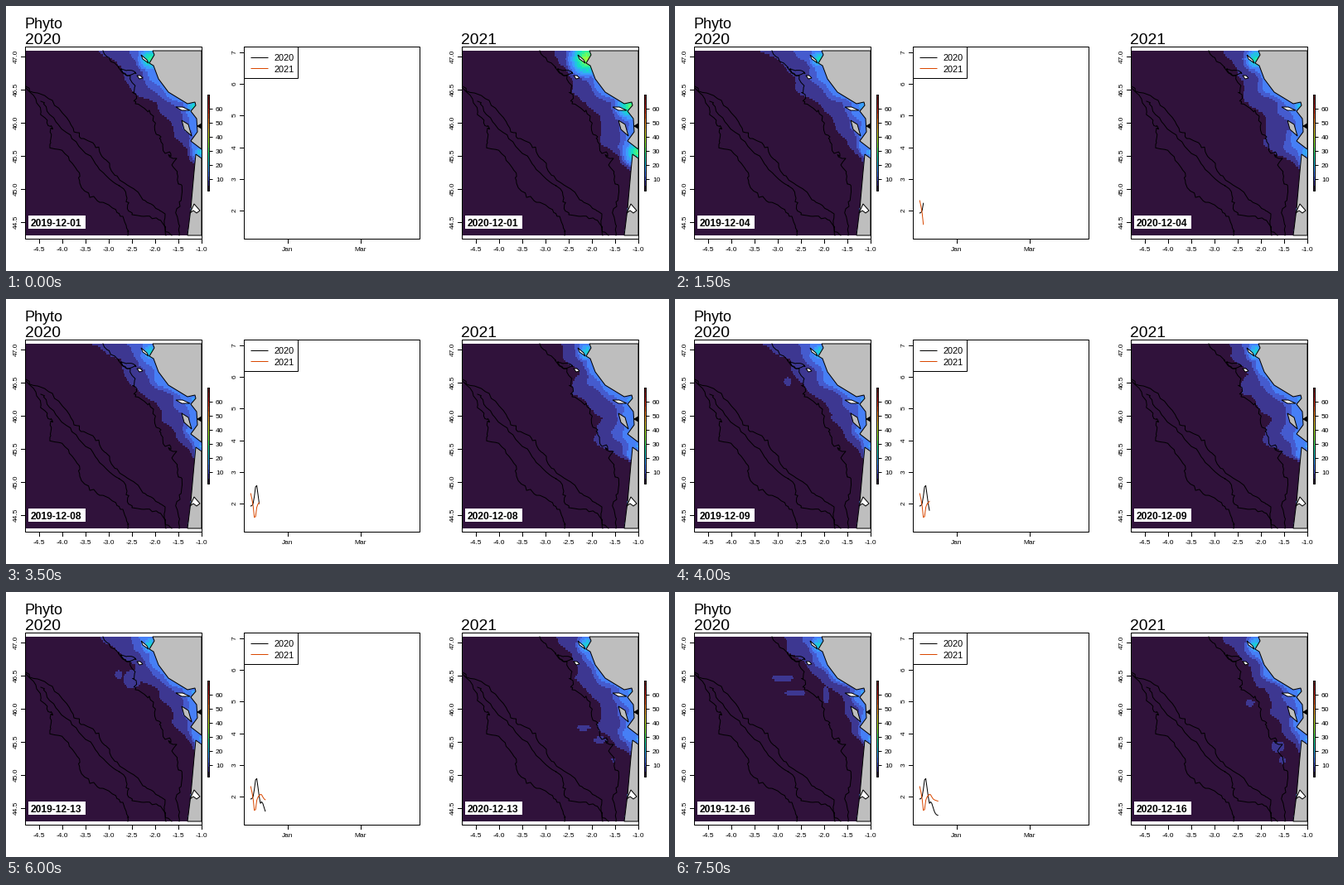
Animation, 800 px wide and 320 px high, one loop 8 s. Source, as a matplotlib script:

```python
import numpy as np
import matplotlib.pyplot as plt
from matplotlib.animation import FuncAnimation
from matplotlib.patches import Polygon, Rectangle

W, H, DPI = 800, 320, 100
PX = 72 / DPI
DAYS = 16
WEST, EAST, TOP, BOTTOM = 24, 236, 54, 277   # raster of the left map
SHIFT = 527                                  # from left map to right map
GREY, ORANGE = "#BEBEBE", "#D94801"
TURBO = plt.get_cmap("turbo")(np.linspace(0, 1, 20))

plt.rcParams["font.family"] = "Liberation Sans"
plt.rcParams["path.snap"] = False
rng = np.random.default_rng(4)

fig = plt.figure(figsize=(W / DPI, H / DPI), dpi=DPI, facecolor="white")
ax = fig.add_axes([0, 0, 1, 1])
ax.axis("off")


def line(xs, ys, color="black", z=4):
    return ax.plot(xs, ys, color=color, lw=PX, zorder=z)[0]


def label(x, y, s, size, ha="center", va="center", **kw):
    return ax.text(x, y, s, fontsize=size * PX, ha=ha, va=va, zorder=8, **kw)


def shape(pts, fill, dx=0):
    ax.add_patch(Polygon(np.add(pts, (dx, 0)), fc=fill, ec="black",
                         lw=PX, zorder=5))


def box(x0, y0, x1, y1, fill="none", z=6, edge="black"):
    ax.add_patch(Rectangle((x0, y0), x1 - x0, y1 - y0, fc=fill, ec=edge,
                           lw=PX, zorder=z))


def rough(pts, amp, rounds=3):
    """Midpoint displacement, for a natural looking contour."""
    p = np.array(pts, float)
    for _ in range(rounds):
        q = np.repeat(p, 2, axis=0)[:-1]
        q[1::2] = (p[1:] + p[:-1]) / 2 + rng.normal(0, amp, (len(p) - 1, 2))
        p, amp = q, amp / 1.6
    return p.clip((WEST, TOP), (EAST, BOTTOM))


# --- geography ---
NORTH = [(177, 54), (179, 59), (173, 69), (178, 72), (184, 88), (196, 104),
         (219, 118), (228, 116), (229, 120), (223, 127), (230, 136),
         (231, 152), (223, 163), (236, 173), (236, 54)]
SOUTH = [(236, 184), (229, 179), (227, 200), (223, 245), (219, 277), (236, 277)]
OLERON = [(212, 138), (220, 143), (224, 157), (215, 149)]
ISLANDS = [
    [(163, 59), (170, 65), (172, 69), (165, 64)],
    [(158, 84), (162, 84), (165, 87), (161, 88)],
    [(205, 122), (213, 122), (222, 126), (212, 126)],
    [(222, 250), (227, 239), (234, 247), (230, 250), (226, 247)],
]
NOTCH = [(231, 145), (236, 142), (236, 148)]

ISOBATHS = [
    rough([(24, 97), (56, 114), (82, 152), (107, 168), (125, 190),
           (151, 219), (178, 241), (192, 251), (200, 277)], 2.5),
    rough([(24, 99), (47, 135), (56, 148), (53, 167), (80, 190), (89, 214),
           (113, 237), (141, 254), (147, 277)], 2.5),
    rough([(42, 115), (63, 143), (96, 178), (125, 209), (146, 232),
           (152, 252), (184, 258), (193, 277)], 2.5),
    rough([(117, 54), (140, 80), (155, 100), (156, 118), (178, 133),
           (187, 158), (192, 178), (206, 184), (208, 215), (210, 242),
           (209, 277)], 3.2),
    rough([(139, 76), (148, 84), (156, 80), (139, 76)], 1.5),
]

# --- concentration field ---
NX, NY = 137, 100
cx = WEST + (np.arange(NX) + 0.5) * (EAST - WEST) / NX
cy = TOP + (np.arange(NY) + 0.5) * (BOTTOM - TOP) / NY
gx, gy = np.meshgrid(cx, cy)
shore = np.interp(cy, [54, 70, 90, 104, 118, 140, 166, 182, 277],
                  [177, 175, 185, 196, 221, 229, 226, 230, 219])
offshore = shore[:, None] - gx
ROWS = [54, 72, 90, 115, 145, 170, 186, 198]

# spread: plume width along ROWS at the start, middle and end of the loop
# patches: x, y, rx, ry and the day at which the patch is largest
PLUMES = [
    dict(spread=[[65, 36, 42, 42, 29, 12, 0, 0],
                 [75, 42, 41, 49, 37, 18, 7, 0],
                 [47, 36, 24, 28, 20, 13, 0, 0]],
         river=1.5, strip=16, phase=0,
         patches=[(136, 100, 10, 11, 10), (152, 106, 11, 12, 12.3),
                  (130, 104, 13, 4, 15), (145, 122, 12, 4, 15),
                  (182, 125, 4, 10, 15)]),
    dict(spread=[[41, 33, 26, 48, 36, 33, 5, 0],
                 [38, 27, 22, 56, 39, 46, 24, 0],
                 [41, 28, 18, 36, 34, 20, 8, 0]],
         river=4, strip=0, phase=2,
         patches=[(170, 164, 11, 4, 11), (190, 179, 11, 5, 11),
                  (167, 134, 5, 4, 15), (200, 187, 8, 7, 15),
                  (206, 203, 5, 5, 14)]),
]


def field(plume, day):
    u = day / (DAYS - 1)
    weights = (1 - u) * (1 - 2 * u), 4 * u * (1 - u), u * (2 * u - 1)
    reach = np.interp(cy, ROWS, np.dot(weights, plume["spread"]))
    burst = max(0, 1 - abs(day - 5) / 2)
    reach = np.maximum(reach, plume["strip"] * burst)[:, None]

    turn = 0.5 * day + plume["phase"]
    swirl = (2.5 * np.sin(gx / 7 + gy / 8 + turn)
             + 1.5 * np.sin(gy / 3.5 - gx / 9 - turn))
    dist = offshore + swirl * np.minimum(1, reach / 25)
    level = sum((dist < k * reach).astype(int) for k in (1, 0.43, 0.2))

    for x, y, rx, ry, peak in plume["patches"]:
        size = 1 - abs(day - peak) / 2.5
        inside = ((gx - x) / rx) ** 2 + ((gy - y) / ry) ** 2 < size
        level = np.maximum(level, inside)

    fresh = plume["river"] * np.exp(-day / 2)
    for x, y, base in ((174, 64, 6.5), (226, 121, 5), (234, 177, 4.5)):
        bump = base + fresh - np.hypot(gx - x, gy - y) / 3
        level = np.maximum(level, np.floor(bump).astype(int))
    return TURBO[level]


# --- static parts ---
def axis_x(ticks):
    line([ticks[0][0] + .5, ticks[-1][0] + .5], [281.5] * 2)
    for x, s in ticks:
        line([x + .5] * 2, [281.5, 286.5])
        label(x, 295, s, 8.4)


def axis_y(x, ticks):
    for y, s in ticks:
        line([x - 4.5, x + .5], [y + .5] * 2)
        label(x - 11, y, s, 8.4, rotation=90)


def colour_bar(x):
    ax.imshow(TURBO[::-1, None], extent=(x, x + 3, 223, 107), aspect="auto",
              interpolation="nearest", zorder=3)
    box(x + .5, 107.5, x + 2.5, 223.5)
    for v in range(10, 70, 10):
        y = round(226 - 1.7 * v) + .5
        line([x + 2.5, x + 6], [y, y])
        label(x + 10, y, v, 8.4, ha="left", va="center_baseline")


def build_map(dx, year):
    img = ax.imshow(np.zeros((NY, NX, 4)), aspect="auto", zorder=1,
                    extent=(WEST + dx, EAST + dx, BOTTOM, TOP),
                    interpolation="nearest")
    for p in ISOBATHS:
        line(p[:, 0] + dx, p[:, 1], z=2)
    for land in (NORTH, SOUTH, OLERON):
        shape(land, GREY, dx)
    for island in ISLANDS:
        shape(island, "white", dx)
    shape(NOTCH, "black", dx)
    box(23.5 + dx, 49.5, 236.5 + dx, 281.5)
    axis_x([(40 + 28 * i + dx, f"{-4.5 + i / 2:.1f}") for i in range(8)])
    axis_y(23 + dx, [(61 + 40 * i, f"{47 - i / 2:.1f}") for i in range(6)])
    label(22.5 + dx, 45.5, year, 19.3, ha="left", va="baseline")
    box(27 + dx, 253, 96 + dx, 269, "white", 7, "none")
    date = label(29.5 + dx, 266.5, "", 12, ha="left", va="baseline",
                 weight="bold")
    colour_bar(243 + dx)
    return img, date


maps = [build_map(0, "2020"), build_map(SHIFT, "2021")]
label(22.5, 27, "Phyto", 18, ha="left", va="baseline")

box(287.5, 49.5, 499.5, 281.5)
axis_x([(340, "Jan"), (428, "Mar")])
axis_y(287, [(round(247 - 38.2 * (v - 2)), v) for v in range(7, 1, -1)])
box(287.5, 49.5, 352.5, 87.5, "white", 3)
for y, s, c in ((62.5, "2020", "black"), (75.5, "2021", ORANGE)):
    line([296, 316], [y, y], c)
    label(323.5, y + 4, s, 11, ha="left", va="baseline")


# --- daily means ---
def hump(d, centre, width):
    return np.exp(-((d - centre) / width) ** 2)


d = np.arange(DAYS)
days = 295.3 + 1.46 * d
means = [
    250 + 20 / (1 + np.exp(11 - d)) - 26 * hump(d, 4.6, 1.8) + 5 * hump(d, 8, 0.8),
    245 + 0.5 * d - 10 * np.exp(-d / 1.3) + 20 * hump(d, 3.4, 1.3)
    - 5 * hump(d, 8.5, 1.8),
]
traces = [line([], []), line([], [], ORANGE, 5)]

ax.set_xlim(0, W)
ax.set_ylim(H, 0)


def draw(day):
    shown = day + 1 if day else 0
    for i, (img, date) in enumerate(maps):
        img.set_data(field(PLUMES[i], day))
        date.set_text(f"{2019 + i}-12-{day + 1:02d}")
        traces[i].set_data(days[:shown], means[i][:shown])
    return traces


anim = FuncAnimation(fig, draw, frames=DAYS, interval=500,
                     init_func=lambda: draw(0), repeat=True)
plt.show()
```
